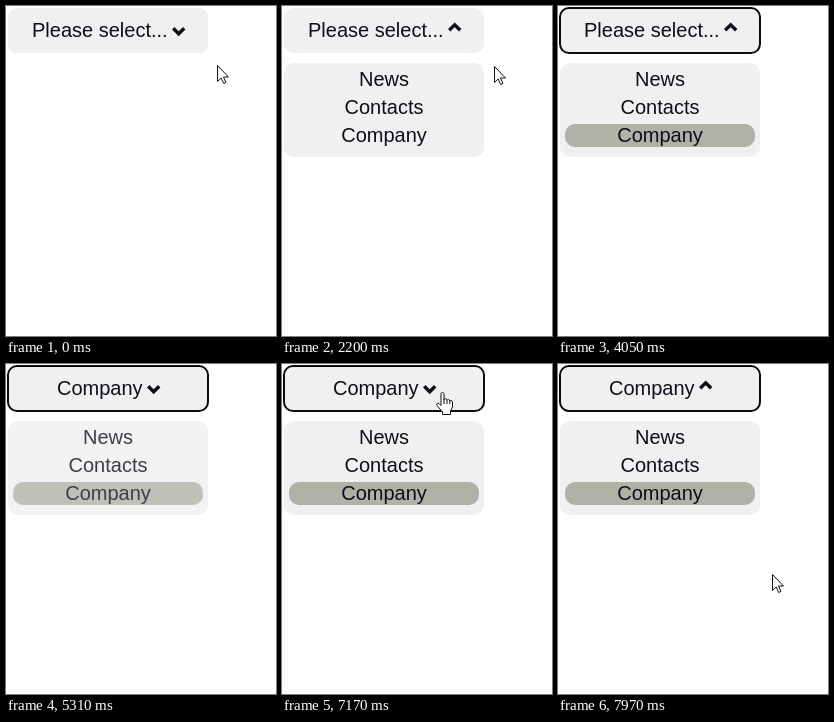
An HTML page that plays this animation: 270 by 330 pixels, repeating every 8 s.

```html
<!DOCTYPE html>
<html lang="en">
<head>
<meta charset="utf-8">
<title>Custom select</title>
<style>
  html, body { margin: 0; width: 100%; height: 100%; overflow: hidden; background: #fff; }
  svg { display: block; width: 270px; height: 330px; }
  text { font: 20px "Liberation Sans", Arial, sans-serif; fill: #100d1a; text-anchor: middle; }
  .cursor { fill: #fff; stroke: #111; stroke-linejoin: round; }
</style>
</head>
<body>
<svg viewBox="0 0 270 330">
  <rect id="button" x="2" y="2" width="200" height="45" rx="9" fill="#eff1f1" stroke-width="2"/>
  <text id="label" x="93.8" y="31"></text>
  <path id="chevron" fill="none" stroke="#100d1a" stroke-width="3.4"/>
  <g id="menu">
    <rect x="2" y="57" width="200" height="94" rx="10" fill="#f0f0f0"/>
  </g>
  <circle id="press" r="12" fill="#ff0" fill-opacity=".5"/>
  <path id="arrow" class="cursor" d="M.5 .5V16.5L4.2 13L6.7 18.5L8.9 17.5L6.5 12H11.5Z"/>
  <path id="hand" class="cursor" d="M-1 13.5V2C-1 0 2 0 2 2V7.5C2.5 6.2 5 6.5 5 8.3C5.5 7 7.8 7.4 7.8 9C8.4 8 10.5 8.5 10.5 10V15L8.5 19V22.5H.5V20L-5 13.5C-6 12-4.5 10.5-3 11.5ZM2 7V12M5 8.3V12M7.8 9V12"/>
</svg>
<script>
const LOOP = 8000;
const $ = id => document.getElementById(id);
const clamp = v => Math.max(0, Math.min(1, v));

const rows = ['News', 'Contacts', 'Company'].map((name, i) => {
  const y = 62 + 28 * i;
  $('menu').insertAdjacentHTML('beforeend',
    `<rect x="7" y="${y}" width="190" height="23" rx="10" fill="#b1b1a6"/>
     <text x="102" y="${y + 18}">${name}</text>`);
  return { y, mark: $('menu').querySelectorAll('rect')[i + 1] };
});

// Whole steps finished since start, -1 before it
const step = (t, start, end, count) =>
  t < start ? -1 : Math.min(count - 1, Math.floor((t - start) / (end - start) * (count - 1) + 1e-6));
const within = (t, a, b) => t >= a && t < b;
const ease = p => p * p * (3 - 2 * p);
const mix = (a, b, p) => a.map((v, i) => Math.round(v + (b[i] - v) * p));

const HOME = [211, 59], FIRST = [174, 28], SIDE = [212, 60];
const RIGHT = [239, 113], SECOND = [160, 28], BELOW = [214, 210];

function pointer(t) {
  if (t < 1650) return mix(HOME, FIRST, ease((step(t, 60, 330, 5) + 1) / 5));
  if (t < 2260) return mix(FIRST, SIDE, ease(clamp((step(t, 1650, 2260, 10) - 3) / 5)));
  if (t < 6510) return null;
  if (t < 7370) return mix(RIGHT, SECOND, ease(clamp(step(t, 6510, 7300, 13) / 7)));
  return mix(SECOND, BELOW, ease((step(t, 7370, 7970, 10) + 1) / 10));
}

function menuOpacity(t) {
  if (t < 5310) return clamp(step(t, 1650, 2260, 10) / 4);
  if (t < 6510) return 1 - (step(t, 5310, 5580, 5) + 1) / 5;
  return clamp((step(t, 6510, 7300, 13) - 6) / 4);
}

function draw(t) {
  const focused = t >= 3260, chosen = t >= 5310;
  const opacity = menuOpacity(t);
  const selected = t < 3260 ? -1 : t < 3660 ? 0 : t < 4050 ? 1 : 2;
  const up = within(t, 1850, 5310) || t >= 7300;
  const at = pointer(t);

  $('button').setAttribute('fill', focused ? '#f0f0f0' : '#eff1f1');
  $('button').setAttribute('stroke', focused ? '#0c0c0c' : 'none');
  const label = chosen ? 'Company' : 'Please select...';
  if ($('label').textContent !== label) $('label').textContent = label;
  const x = chosen ? 147.7 : 172.7;
  $('chevron').setAttribute('d', up
    ? `M${x - 5.5} 24.3l5.5-5.5l5.5 5.5`
    : `M${x - 5.5} 22.3l5.5 5.5l5.5-5.5`);

  $('menu').style.opacity = opacity;
  const inside = at && at[0] > 7 && at[0] < 197;
  const over = inside && opacity ? rows.findIndex(r => within(at[1], r.y, r.y + 23)) : -1;
  rows.forEach((r, i) => {
    r.mark.style.visibility = i === selected || i === over ? 'visible' : 'hidden';
  });

  const linked = over >= 0 || (at && at[0] < 202 && at[1] < 47);
  const pressed = within(t, 590, 660) || within(t, 7235, 7370);
  const show = (id, on) => {
    $(id).style.display = on ? '' : 'none';
    if (on) $(id).setAttribute('transform', `translate(${at})`);
  };
  show('arrow', at && !linked);
  show('hand', at && linked);
  show('press', at && pressed);
}

const start = performance.now();
function frame() {
  draw((performance.now() - start) % LOOP);
  requestAnimationFrame(frame);
}
frame();
</script>
</body>
</html>
```
